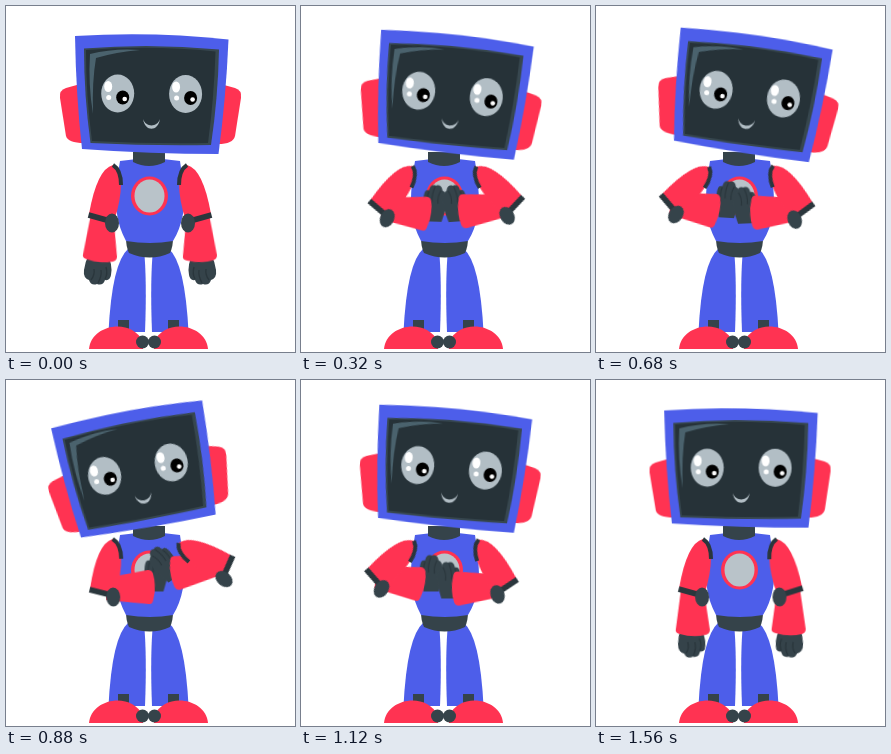
An HTML page without scripts for the animation above (1.6 s loop, 289 by 346 pixels).

```html
<!DOCTYPE html>
<html lang="en">
<head>
<meta charset="utf-8">
<title>Robot rubbing its hands</title>
<style>
  html, body { margin: 0; width: 100%; height: 100%; overflow: hidden; background: #fff; }
  svg { display: block; width: 100vw; height: 100vh; }
  .red { fill: #ff3352; }
  .blue { fill: #4d5eea; }
  .dark { fill: #35434a; }
  .line { fill: none; stroke: #2a363c; }
  .move { animation: 1.6s ease-in-out infinite; }
  .head { animation-name: head; transform-origin: 146px 155px; }
  .arm-l { animation-name: arm-l; }
  .arm-r { animation-name: arm-r; }
  .fore-l { animation-name: fore-l; }
  .fore-r { animation-name: fore-r; }
  .hand-l { animation-name: hand-l; }
  .hand-r { animation-name: hand-r; }

  @keyframes head {
    0%, 100% { transform: rotate(0deg); }
    20% { transform: rotate(5deg); }
    32.5% { transform: rotate(-9.7deg); }
    44% { transform: rotate(7.5deg); }
    56% { transform: rotate(-12deg); }
    70% { transform: rotate(4.2deg); }
    82.5% { transform: rotate(-9.7deg); }
  }
  @keyframes arm-l {
    0%, 100% { transform: translate(107px, 170px) rotate(0deg); }
    20% { transform: translate(107px, 170px) rotate(25deg); }
    32.5% { transform: translate(107px, 170px) rotate(-1deg); }
    44% { transform: translate(107px, 170px) rotate(35deg); }
    56% { transform: translate(107px, 170px) rotate(-2deg); }
    70% { transform: translate(107px, 170px) rotate(33deg); }
    82.5% { transform: translate(107px, 170px) rotate(-5deg); }
  }
  @keyframes arm-r {
    0%, 100% { transform: translate(181px, 170px) rotate(0deg); }
    20% { transform: translate(181px, 170px) rotate(-31deg); }
    32.5% { transform: translate(181px, 170px) rotate(-46deg); }
    44% { transform: translate(181px, 170px) rotate(-20deg); }
    56% { transform: translate(181px, 170px) rotate(-51deg); }
    70% { transform: translate(181px, 170px) rotate(-18deg); }
    82.5% { transform: translate(181px, 170px) rotate(-47deg); }
  }
  @keyframes fore-l {
    0%, 100% { transform: translate(96px, 212px) rotate(3deg); }
    20% { transform: translate(86px, 203px) rotate(-83deg); }
    32.5% { transform: translate(105px, 209px) rotate(-92deg); }
    44% { transform: translate(79px, 198px) rotate(-80deg); }
    56% { transform: translate(105px, 209px) rotate(-93deg); }
    70% { transform: translate(80px, 198px) rotate(-81deg); }
    82.5% { transform: translate(107px, 210px) rotate(-91deg); }
  }
  @keyframes fore-r {
    0%, 100% { transform: translate(192px, 212px) rotate(-3deg); }
    20% { transform: translate(201px, 200px) rotate(82deg); }
    32.5% { transform: translate(206px, 192px) rotate(66deg); }
    44% { transform: translate(198px, 204px) rotate(86deg); }
    56% { transform: translate(208px, 185px) rotate(78deg); }
    70% { transform: translate(195px, 206px) rotate(86deg); }
    82.5% { transform: translate(206px, 190px) rotate(67deg); }
  }
  @keyframes hand-l {
    0%, 100% { transform: translate(92px, 251px) rotate(0deg); }
    20% { transform: translate(133px, 212px) rotate(-178deg) scale(.85, 1.2); }
    32.5% { transform: translate(149px, 210px) rotate(-187deg) scale(.85, 1.2); }
    44% { transform: translate(130px, 208px) rotate(-176deg) scale(.85, 1.2); }
    56% { transform: translate(150px, 208px) rotate(-180deg) scale(.85, 1.2); }
    70% { transform: translate(130px, 208px) rotate(-180deg) scale(.85, 1.2); }
    82.5% { transform: translate(150px, 213px) rotate(-182deg) scale(.85, 1.2); }
  }
  @keyframes hand-r {
    0%, 100% { transform: translate(196px, 251px) rotate(0deg); }
    20% { transform: translate(155px, 212px) rotate(176deg) scale(.85, 1.2); }
    32.5% { transform: translate(168px, 210px) rotate(160deg) scale(.85, 1.2); }
    44% { transform: translate(149px, 214px) rotate(178deg) scale(.85, 1.2); }
    56% { transform: translate(167px, 195px) rotate(145deg) scale(.85, 1.2); }
    70% { transform: translate(148px, 215px) rotate(180deg) scale(.85, 1.2); }
    82.5% { transform: translate(162px, 212px) rotate(163deg) scale(.85, 1.2); }
  }
</style>
</head>
<body>
<svg viewBox="0 0 289 346" preserveAspectRatio="none">
  <defs>
    <g id="leg">
      <path class="blue" d="M122 243Q106 257 102.500 326H139Q141 275 138 243Z"/>
      <path class="dark" d="M112 314h11v9h-11z"/>
      <path class="red" d="M83 343C85 318 126 311 137 336V343Z"/>
      <circle class="dark" cx="136.500" cy="336" r="6.500"/>
    </g>
    <g id="arm">
      <path class="red" d="M0-11Q-16-7-24 38L1 45Q8 25 8 6Q6-6 0-11Z"/>
      <path class="line" stroke-width="4" d="M0-11Q8-6 8 9"/>
      <path class="line" stroke-width="5.500" d="M-24.500 39L-3 45"/>
      <ellipse class="dark" cx="-1" cy="47" rx="7" ry="9.500"/>
    </g>
    <path id="fore" class="red" d="M-11-5H11L17 38Q17 42 13 43Q0 46-13 42Q-18 41-17 37Z"/>
    <g id="hand">
      <path class="dark" d="M-9-3H9Q15 7 13 18Q12 24 7 23Q5 29-1 27Q-7 29-9 23Q-15 21-14 13Q-13 5-9-3Z"/>
      <path class="line" stroke-width="1.300" d="M-7 23Q-3 18-4 12M0 26Q4 19 3 13M7 22Q10 17 8 10"/>
    </g>
    <g id="eye">
      <ellipse fill="#b2bec5" rx="16.500" ry="19"/>
      <ellipse fill="#fff" cx="-9.500" cy="-7" rx="4" ry="5.500"/>
      <circle fill="#fff" cx="-9" cy="4" r="2.500"/>
      <ellipse cx="5" cy="4" rx="6.500" ry="7"/>
      <circle fill="#fff" cx="7" cy="5.500" r="2.300"/>
    </g>
  </defs>

  <use href="#leg"/>
  <use href="#leg" transform="matrix(-1 0 0 1 285 0)"/>
  <path class="dark" d="M120 232H167Q167 241 164 247Q144 256 123 247Q120 241 120 232Z"/>
  <path class="blue" d="M114 155Q144 150 174 155Q180 195 177 208Q174 224 167 235Q144 239 120 235Q113 222 111 208Q108 190 114 155Z"/>
  <path class="dark" d="M127 146H159V156Q143 164 127 156Z"/>
  <ellipse class="red" cx="143.500" cy="190" rx="18.500" ry="19.500"/>
  <ellipse fill="#b9c3c9" cx="143.500" cy="190" rx="15" ry="16.500"/>

  <g class="move hand-l"><use href="#hand"/></g>
  <g class="move hand-r"><use href="#hand" transform="scale(-1 1)"/></g>
  <g class="move fore-l"><use href="#fore"/></g>
  <g class="move fore-r"><use href="#fore"/></g>
  <g class="move arm-l"><use href="#arm"/></g>
  <g class="move arm-r"><use href="#arm" transform="scale(-1 1)"/></g>

  <g class="move head">
    <path class="red" d="M78 77L60 82Q53 84 54 92L60 130Q62 137 78 137Z"/>
    <path class="red" d="M218 79L229 82Q236 84 235 92L229 130Q227 138 212 138Z"/>
    <path class="blue" d="M69 30Q146 25 222.500 33.500Q220 92 212.500 148Q145 148 76 143Q70 90 69 30Z"/>
    <path fill="#37474f" d="M78 42.500Q146 37 213 43.500Q212 92 205 139Q146 140 84.500 137Q78 90 78 42.500Z"/>
    <path fill="#263238" d="M80 44Q146 39 209.500 45.500Q208 92 202 137Q146 138 86 135Q80 90 80 44Z"/>
    <path fill="#4a626d" d="M84 48Q108 42 134 44Q110 46 90 52Q86 75 87 108Q82 78 84 48Z"/>
    <use href="#eye" x="111.700" y="87.500"/>
    <use href="#eye" x="179.600" y="88"/>
    <path fill="#b2bec5" d="M137 113C139 126 152 126 154 113C151 121.500 140 121.500 137 113Z"/>
  </g>
</svg>
</body>
</html>
```
